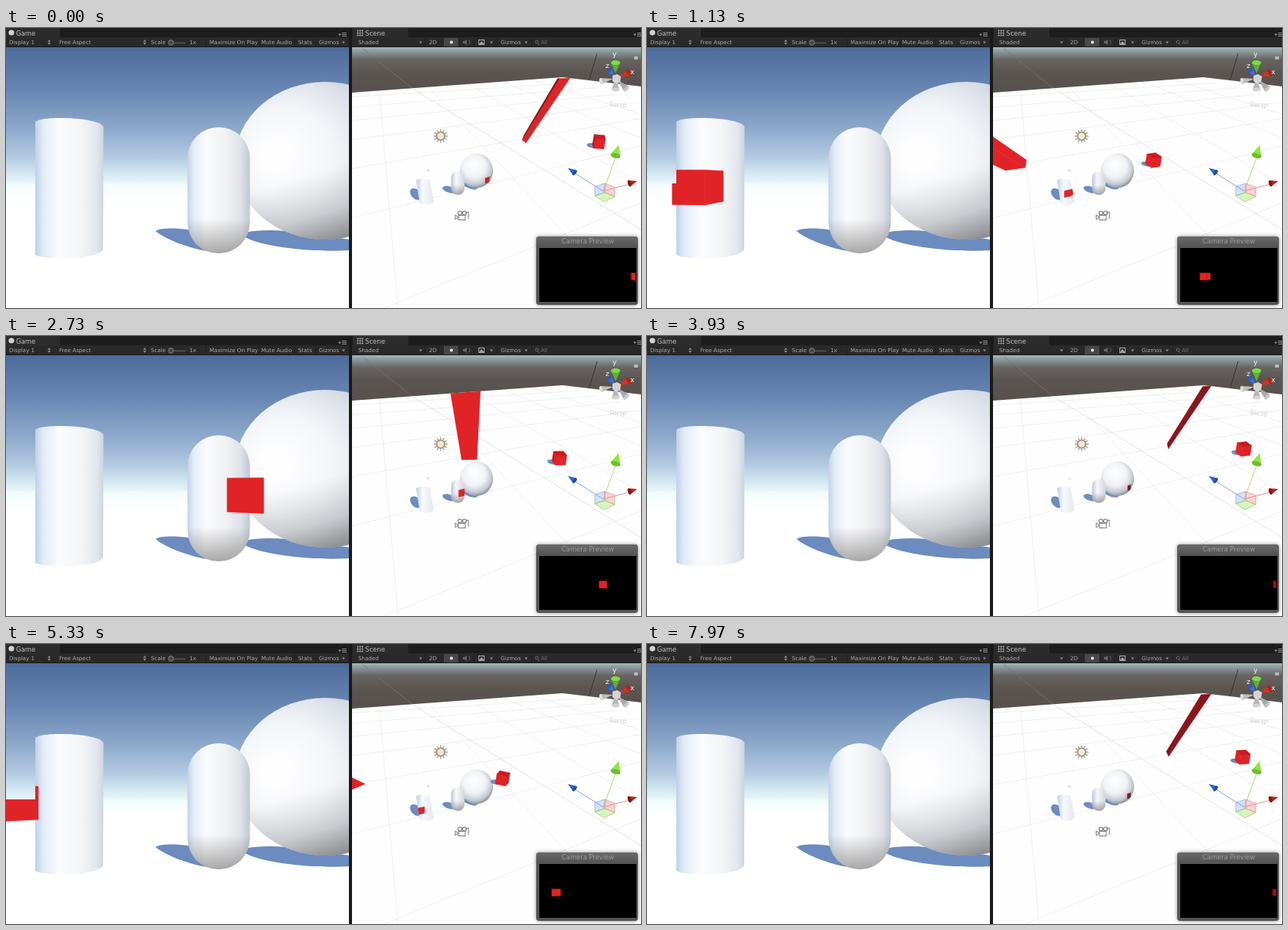
These frames come from a looping animation (824x364 px, 8 s). An HTML page with a canvas:

```html
<!DOCTYPE html>
<html lang="en">
<head>
<meta charset="utf-8">
<title>Projected cube</title>
<style>
html, body { margin: 0; width: 100%; height: 100%; overflow: hidden; background: #1c1c1c; }
canvas { display: block; width: 824px; height: 364px; }
</style>
</head>
<body>
<canvas id="stage" width="824" height="364"></canvas>
<script>
const ctx = document.getElementById('stage').getContext('2d');
const LOOP = 8000, FOCAL = 293.6, CX = 222.5, CY = 194.5;
const HORIZON = 202, DEPTH = 6.95, DROP = 0.28;
const IMAGE_EDGE = 516; // right border of the projected picture
const FONT = '"DejaVu Sans", sans-serif';
const RAD = Math.PI / 180;

function poly(points, fill, stroke, width = 1) {
  ctx.beginPath();
  points.forEach(([x, y]) => ctx.lineTo(x, y));
  ctx.closePath();
  if (fill) { ctx.fillStyle = fill; ctx.fill(); }
  if (stroke) { ctx.strokeStyle = stroke; ctx.lineWidth = width; ctx.stroke(); }
}
function line(x1, y1, x2, y2, color, width = 1) {
  ctx.beginPath();
  ctx.moveTo(x1, y1);
  ctx.lineTo(x2, y2);
  ctx.strokeStyle = color;
  ctx.lineWidth = width;
  ctx.stroke();
}
function rect(x, y, w, h, fill) { ctx.fillStyle = fill; ctx.fillRect(x, y, w, h); }
function label(str, x, y, size = 7.1, color = '#a9a9a9', align = 'left') {
  ctx.font = `${size}px ${FONT}`;
  ctx.textAlign = align;
  ctx.fillStyle = color;
  ctx.fillText(str, x, y);
}
function oval(x, y, rx, ry, fill, turn = 0) {
  ctx.beginPath();
  ctx.ellipse(x, y, rx, ry, turn, 0, 7);
  ctx.fillStyle = fill;
  ctx.fill();
}
function stops(gradient, list) {
  list.forEach(([at, color]) => gradient.addColorStop(at, color));
  return gradient;
}
const linear = (x1, y1, x2, y2, list) => stops(ctx.createLinearGradient(x1, y1, x2, y2), list);
const radial = (x1, y1, r1, x2, y2, r2, list) =>
  stops(ctx.createRadialGradient(x1, y1, r1, x2, y2, r2), list);
function shade(path, ...fills) {
  for (const fill of fills) { ctx.fillStyle = fill; ctx.fill(path); }
}
function clipped(path, draw) {
  ctx.save();
  ctx.clip(path);
  draw();
  ctx.restore();
}
function box(x, y, w, h) {
  const p = new Path2D();
  p.rect(x, y, w, h);
  return p;
}
function pill(x, y, w, h, r) {
  const p = new Path2D();
  p.roundRect(x, y, w, h, r);
  return p;
}
function ball(x, y, rx, ry) {
  const p = new Path2D();
  p.ellipse(x, y, rx, ry, 0, 0, 2 * Math.PI);
  return p;
}

// Shapes in the game view
const gameArea = box(0, 25, 445, 339);
const bigBall = ball(414, 172.5, 117, 102.5);
const bigPill = pill(235.5, 129, 81, 164, 40.5);
const bigTube = new Path2D('M38 122 C42 114 119 115 126.5 128 L126 288 C119 301 55 303 38 295 Z');
const solid = new Path2D();
[bigBall, bigPill, bigTube, box(0, HORIZON, 445, 162)].forEach(p => solid.addPath(p));

// Shapes in the scene view
const sceneArea = box(449, 25, 375, 339);
const floor = new Path2D('M449 84 L722 64 L824 76 V364 H449 Z');
const smallBall = ball(610.5, 185.5, 21.5, 22.5);
const smallPill = pill(577.5, 186, 17.5, 31, 8.7);
const smallTube = new Path2D('M532 198 C536 195 546 195 550 198 L555 226 C552 230 541 231 537 228 Z');

// Game pixel on the ground -> scene pixel; k is the homogeneous weight
function groundPoint(u, v, k = 1) {
  const U = u - 285 * k, w = v - HORIZON * k;
  const den = 0.001218 * U + 0.03679 * w + k;
  return [(1.5713 * U + 22.3 * w + 575 * k) / den, (0.04454 * U + 9.215 * w + 73 * k) / den];
}
const onGround = (x, d) => groundPoint(CX * d + FOCAL * x, CY * d + FOCAL, d);

function faceColor(psi) {
  const lit = Math.min(1, 2.5 * Math.max(0, Math.cos((psi + 30) * RAD)));
  const mix = (a, b) => Math.round(a + (b - a) * lit);
  return `rgb(${mix(138, 224)},${mix(22, 35)},${mix(28, 38)})`;
}

// Cube pose: swings sideways while spinning about its vertical axis
function cubeAt(t) {
  const mid = 272 + 292 * Math.cos(2 * Math.PI * (t + 368) / 4015);
  const x = (mid - CX) / FOCAL * DEPTH;
  const spin = 21 + 0.291 * (t - 2730);
  const faces = [0, 1, 2, 3].map(i => {
    const psi = spin + 90 * i;
    const corner = a => [-Math.SQRT1_2 * Math.sin(a * RAD), -Math.SQRT1_2 * Math.cos(a * RAD)];
    const n = [-Math.sin(psi * RAD), -Math.cos(psi * RAD)];
    const ends = [corner(psi + 45), corner(psi - 45)];
    const edges = ends.map(([cx, cz]) => {
      const s = FOCAL / (DEPTH + cz);
      return {
        u: Math.min(IMAGE_EDGE, CX + (x + cx) * s),
        top: CY + (DROP - 0.5) * s,
        low: CY + (DROP + 0.5) * s
      };
    });
    const facing = n[0] * (x + n[0] / 2) + n[1] * (DEPTH + n[1] / 2) < 0;
    return { n, psi, ends, edges, seen: facing && edges[0].u < edges[1].u };
  });
  return { mid, faces };
}
function drawImage(cube, map) {
  for (const { seen, edges: [a, b], psi } of cube.faces) {
    const color = faceColor(psi);
    if (seen) poly([map(a.u, a.top), map(b.u, b.top), map(b.u, b.low), map(a.u, a.low)], color, color, 0.4);
  }
}
function drawBeam(cube) {
  for (const { seen, edges: [a, b], psi } of cube.faces) {
    const color = faceColor(psi);
    if (seen) poly([groundPoint(a.u, HORIZON), groundPoint(b.u, HORIZON),
      groundPoint(b.u, b.low), groundPoint(a.u, a.low)], color, color, 0.4);
  }
}

function drawGame(cube) {
  rect(0, 25, 445, 178, linear(0, 25, 0, 203, [
    [0, '#4d6b9b'], [0.3, '#6785b2'], [0.6, '#8ea9cc'], [0.8, '#b3cae1'], [0.93, '#d6e9f3'], [1, '#ebf8f9']]));
  rect(0, 202, 445, 162, linear(0, 202, 0, 225, [[0, '#f2fbfc'], [1, '#ffffff']]));

  ctx.filter = 'blur(0.7px)';
  shade(new Path2D('M194 264 C202 258 238 260 262 268 L288 291 C262 295 212 279 194 264 Z'), '#6c8bbf');
  shade(new Path2D('M310 266 C345 258 400 268 446 275 V289 C400 292 335 285 310 272 Z'), '#6c8bbf');
  ctx.filter = 'none';

  shade(bigBall,
    radial(350, 165, 20, 385, 168, 145, [
      [0, '#fdfdfe'], [0.35, '#f3f5f8'], [0.65, '#dce1e9'], [0.9, '#c0cad9'], [1, '#b2bfd4']]),
    linear(395, 190, 420, 276, [
      [0, 'rgba(120,117,117,0)'], [0.6, 'rgba(120,117,117,.25)'], [1, 'rgba(110,107,107,.65)']]));
  shade(bigPill,
    linear(235, 0, 317, 0, [
      [0, '#c1d0e8'], [0.1, '#e3ebf5'], [0.3, '#fafbfd'], [0.6, '#f1f2f4'], [0.85, '#dfe2e7'], [1, '#bfc7d4']]),
    linear(0, 248, 0, 293, [[0, 'rgba(122,118,117,0)'], [1, 'rgba(122,118,117,.62)']]));
  shade(bigTube, linear(38, 0, 127, 0, [
    [0, '#c0cfe8'], [0.12, '#e4ecf6'], [0.35, '#fbfcfe'], [0.7, '#f2f4f6'], [0.9, '#e1e6ed'], [1, '#cbd4e1']]));

  clipped(solid, () => drawImage(cube, (u, v) => [u, v]));
}

function drawGrid() {
  for (let d = -3; d < 39; d += 6) {
    const from = Math.max(-36, (-7 - 0.67 * d) / 0.358);
    line(...onGround(from, d), ...onGround(36, d), '#ebebeb', 0.8);
  }
  for (let x = -44; x < 36; x += 8) {
    const from = Math.max(-10, (-7 - 0.358 * x) / 0.67);
    line(...onGround(x, from), ...onGround(x, 39), '#ebebeb', 0.8);
  }
}

function drawSceneCube(cube) {
  const x = 657 + (cube.mid - 67) / 4, y = 172 - (x - 657) * 0.214;
  const place = ([a, c], up) =>
    [x + 10.4 * a - 9 * c + 2 * up, y - 2.2 * a - 5 * c - 12.5 * up];
  oval(x - 8, y + 5, 8, 3.2, '#6f8cbc', 0.15);
  for (const { n, ends: [a, b], psi } of cube.faces) {
    const color = faceColor(psi - 70);
    if (n[0] * 9 + n[1] * 10.4 < 0)
      poly([place(a, 0.5), place(b, 0.5), place(b, -0.5), place(a, -0.5)], color, color, 0.4);
  }
  poly(cube.faces.map(f => place(f.ends[0], 0.5)), '#cf181d', '#a81016', 0.5);
}

function cone(x, y, dx, dy, r, fill, dark) {
  const len = Math.hypot(dx, dy), px = -dy / len * r, py = dx / len * r;
  poly([[x + dx, y + dy], [x + px, y + py], [x - px, y - py]], fill);
  oval(x, y, r, r * 0.5, dark, Math.atan2(py, px));
}

function drawHandles() {
  line(775, 212, 737, 188, '#8aa4e4');
  line(775, 212, 792, 166, '#a4df75');
  line(775, 212, 809, 203, '#e59a8c');
  poly([[764, 206], [777, 202], [777, 214], [764, 218]], 'rgba(140,170,235,.35)', '#9bb0d8', 0.8);
  poly([[777, 202], [790, 207], [790, 219], [777, 214]], 'rgba(240,130,125,.35)', '#d9a3a0', 0.8);
  poly([[764, 218], [777, 214], [790, 219], [776, 226]], 'rgba(170,235,120,.45)', '#9fc977', 0.8);
  cone(738, 188, -9, -6, 4, '#2f62da', '#234aa8');
  cone(791, 166, 4, -14, 6.5, '#8fe83c', '#6fbd2b');
  cone(809, 202, 10, -3, 4.2, '#b7241c', '#7e1713');
}

function drawCompass() {
  cone(772, 69, 16, -3, 4, '#bdbdbd', '#dcdcdc');
  cone(805, 79, -11, -11, 4.5, '#a9a9a9', '#c9c9c9');
  cone(791, 80, 0, -15, 5, '#b5b5b5', '#d2d2d2');
  cone(783, 55, 7, 8, 4, '#3e6fd8', '#2e59b8');
  cone(791, 45, 0, 14, 6, '#5fae3a', '#7bdc43');
  cone(808, 58, -12, 6, 4.5, '#d8301f', '#b52015');
  poly([[787, 62], [793, 60], [798, 63], [797, 70], [792, 73], [787, 69]], '#d4d4d4');
  label('y', 787, 37, 9, '#f4f4f4');
  label('z', 778, 52, 9, '#f4f4f4');
  label('x', 810, 60, 9, '#f4f4f4');
  label('Persp', 783, 103, 8.3, '#d2d2d2');
  rect(815, 37, 5, 4, '#b9b9b9');
}

function drawIcons() {
  for (let i = 0; i < 12; i++) {
    const a = i * 30 * RAD, c = Math.cos(a), s = Math.sin(a);
    line(564 + 6 * c, 140.5 + 6 * s, 564 + 9 * c, 140.5 + 9 * s, '#8d8878', 1.1);
  }
  oval(564, 140.5, 6, 6, '#8b8574');
  oval(564, 140.5, 4.5, 4.5, '#f3e7d2');
  oval(548, 185, 1.6, 1.6, '#dedada');
  ctx.strokeStyle = '#777';
  ctx.lineWidth = 1;
  ctx.strokeRect(587, 243.5, 9, 6);
  poly([[587, 246], [583, 243], [583, 249]], '#f6f6f6', '#777');
  for (const x of [589, 595]) {
    oval(x, 240.5, 3, 3, '#777');
    oval(x, 240.5, 2, 2, '#f6f6f6');
  }
  line(596, 241, 600, 239, '#777');
  line(600, 239, 600, 248, '#777');
}

function drawPreview(cube) {
  ctx.save();
  ctx.shadowColor = 'rgba(0,0,0,.45)';
  ctx.shadowBlur = 5;
  shade(pill(688, 271, 132, 89, 4), '#555555');
  ctx.restore();
  shade(pill(688, 271, 132, 12, [4, 4, 0, 0]), linear(0, 271, 0, 284, [[0, '#6a6a6a'], [1, '#555555']]));
  label('Camera Preview', 755, 280, 8.4, '#999999', 'center');
  rect(692, 286, 126, 70, '#000');
  const scale = 0.205;
  clipped(box(692, 286, 126, 70), () =>
    drawImage(cube, (u, v) => [756.5 + (u - CX) * scale, 320.5 + (v - CY) * scale]));
}

function drawScene(cube) {
  rect(449, 25, 375, 65, linear(0, 25, 0, 90, [
    [0, '#a3b7bb'], [0.1, '#869495'], [0.25, '#676361'], [0.5, '#5b5552'], [1, '#564f4c']]));
  line(463, 27, 528, 79, '#7b7572', 0.7);
  line(767, 33, 757, 67, '#2d2a29', 0.8);
  shade(floor, '#fefefe');
  clipped(floor, () => {
    drawGrid();
    line(528, 79, 824, 262, '#dcdcdc', 0.8);
    drawBeam(cube);
  });

  oval(532, 216, 9, 6, '#6f8cbc', 0.75);
  oval(575, 210, 9, 4, '#6f8cbc', 0.3);
  oval(599, 201, 15, 6, '#6f8cbc', 0.5);
  shade(smallBall, radial(607, 177, 3, 608, 182, 27, [
    [0, '#fdfdfe'], [0.5, '#f0f2f5'], [0.8, '#c6cbd3'], [1, '#838a96']]));
  clipped(smallBall, () => drawImage(cube, (u, v) =>
    [621 + (u - 480) * 0.18, 199 + (v - 207) * 0.16 - (u - 480) * 0.06]));
  shade(smallPill,
    linear(577, 0, 595, 0, [[0, '#b7c4da'], [0.4, '#f7f8fa'], [1, '#d2d6dd']]),
    linear(0, 204, 0, 217, [[0, 'rgba(110,112,118,0)'], [1, 'rgba(110,112,118,.6)']]));
  clipped(smallPill, () => drawImage(cube, (u, v) =>
    [587 + (u - 285) * 0.25, 205 + (v - 207) * 0.2 - (u - 285) * 0.06]));
  shade(smallTube, linear(533, 0, 555, 0, [[0, '#c6d3e8'], [0.35, '#f8f9fb'], [1, '#e3e7ec']]));
  clipped(smallTube, () => drawImage(cube, (u, v) =>
    [544 + (u - 47) * 0.17, 215.5 + (v - 207) * 0.19 - (u - 47) * 0.04]));

  drawSceneCube(cube);
  drawIcons();
  drawHandles();
  drawCompass();
  drawPreview(cube);
}

function arrows(x) {
  poly([[x - 2, 18], [x, 15], [x + 2, 18]], '#888');
  poly([[x - 2, 19], [x, 22], [x + 2, 19]], '#888');
}
function dropdown(x, y = 19) { poly([[x - 2, y - 1.5], [x + 2, y - 1.5], [x, y + 1.5]], '#8b8b8b'); }
function menu(x) {
  dropdown(x - 4, 9);
  for (let i = 0; i < 3; i++) line(x - 1, 6.5 + 2 * i, x + 5, 6.5 + 2 * i, '#999', 0.9);
}

function drawBars() {
  rect(0, 0, 824, 13, '#1d1d1d');
  rect(0, 12, 824, 13, '#292929');
  rect(0, 0, 70, 13, '#2c2c2c');
  rect(450, 0, 72, 13, '#2c2c2c');
  line(0, 24.5, 824, 24.5, '#191919');
  oval(7, 6, 3.6, 3.6, '#d2d2d2');
  label('Game', 13, 9.5, 8.5, '#bdbdbd');
  for (let i = 0; i < 3; i++) {
    line(455, 3.5 + 3 * i, 464, 3.5 + 3 * i, '#999', 0.8);
    line(456.5 + 3 * i, 2, 456.5 + 3 * i, 11, '#999', 0.8);
  }
  label('Scene', 466, 9.5, 8.5, '#bdbdbd');
  const words = [['Display 1', 4], ['Free Aspect', 69], ['Scale', 188], ['1x', 238], ['Maximize On Play', 264],
    ['Mute Audio', 331], ['Stats', 379], ['Gizmos', 406], ['Shaded', 457], ['2D', 549], ['Gizmos', 642]];
  words.forEach(([str, x]) => label(str, x, 21));
  label('All', 694, 21, 7.1, '#707070');
  arrows(56);
  arrows(180);
  line(211, 19.5, 233, 19.5, '#555', 1.5);
  oval(214, 19, 3.7, 3.7, '#777');
  oval(214, 19, 2.6, 2.6, '#454545');
  for (const x of [438, 538, 630, 675]) dropdown(x);
  for (const x of [259, 328, 374, 402, 446, 543, 567, 587, 607, 637, 682]) line(x + .5, 13, x + .5, 24, '#202020');
  rect(568, 13, 19, 11, '#484848');
  oval(578, 18.5, 2, 2, '#e7e7e7');
  poly([[593, 17], [595, 17], [598, 15], [598, 22], [595, 20], [593, 20]], '#656565');
  ctx.strokeStyle = '#656565';
  ctx.beginPath();
  ctx.arc(598, 18.5, 4, -0.8, 0.8);
  ctx.stroke();
  ctx.strokeStyle = '#aaa';
  ctx.strokeRect(613.5, 15.5, 7, 6);
  poly([[614, 21], [617, 17], [620, 21]], '#aaa');
  ctx.strokeStyle = '#666';
  ctx.beginPath();
  ctx.arc(689, 18, 2, 0, 7);
  ctx.stroke();
  line(690, 20, 692, 22, '#666');
  menu(437);
  menu(820);
  rect(445, 0, 4, 364, '#1a1a1a');
}

function frame(now) {
  const cube = cubeAt(now % LOOP);
  clipped(gameArea, () => drawGame(cube));
  clipped(sceneArea, () => drawScene(cube));
  drawBars();
}

let start;
function tick(now) {
  start ??= now;
  frame(Math.max(0, now - start));
  requestAnimationFrame(tick);
}
requestAnimationFrame(tick);
</script>
</body>
</html>
```
